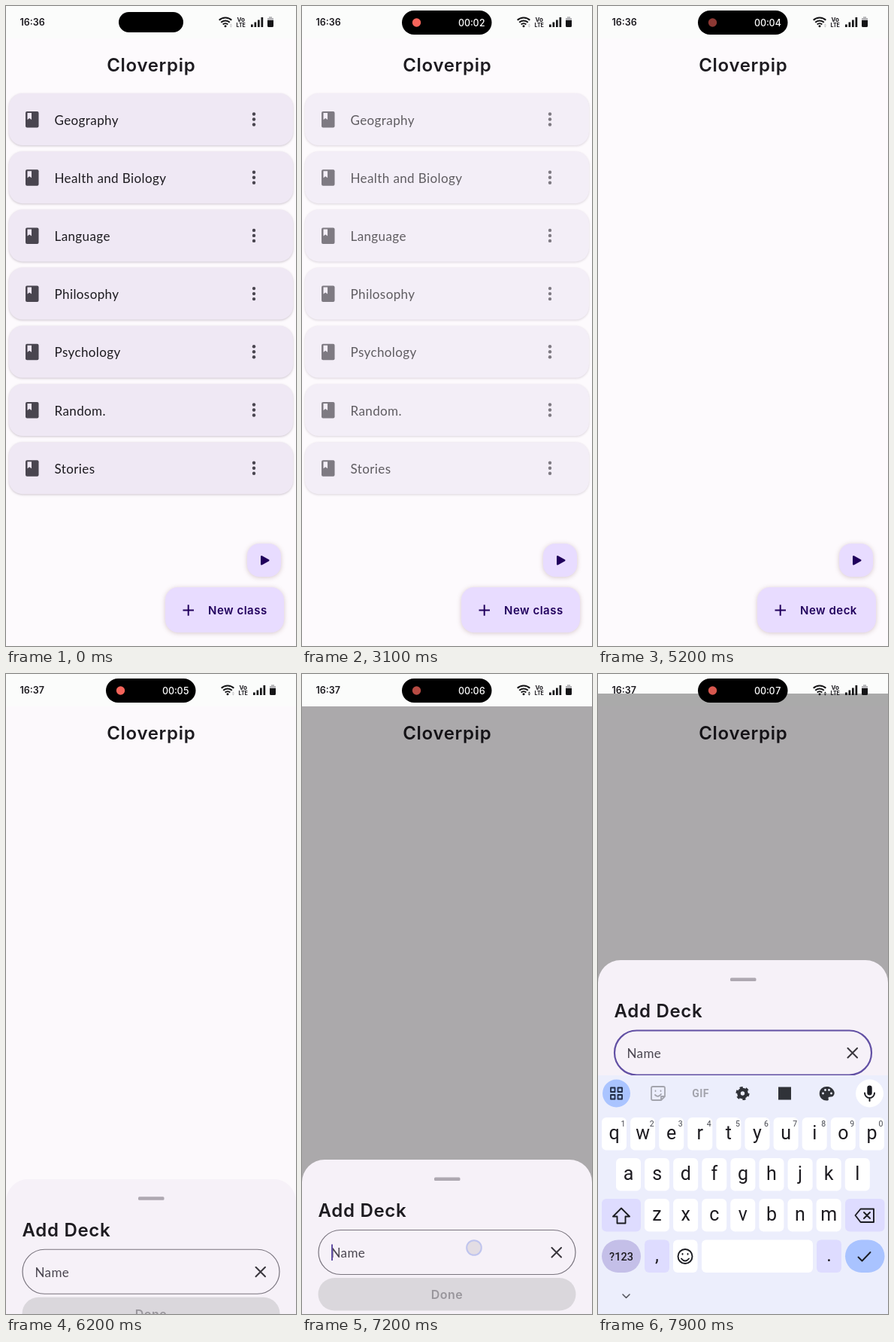
Animation, 386 px wide and 850 px high, one loop 8 s. Source, as an HTML page:

```html
<!DOCTYPE html>
<html lang="en">
<head>
<meta charset="utf-8">
<title>Flashcard app</title>
<style>
  html, body { margin: 0; width: 100%; height: 100%; overflow: hidden; background: #fdfafd; }
  svg { display: block; width: 386px; height: 850px; }
  text { font-family: Inter, "Open Sans", sans-serif; font-weight: 600; fill: #1d1b20; }
  .head { font-size: 24px; letter-spacing: .7px; }
  .body { font: 400 17px Lato, "Open Sans", sans-serif; letter-spacing: .4px; }
  .fab text { font-size: 15px; letter-spacing: .5px; fill: #21005d; }
  .card { fill: #efe8f4; filter: drop-shadow(0 1px 1.5px rgba(70, 50, 75, .26)); }
  .fab rect { fill: #e8dcff; filter: drop-shadow(0 1.5px 3px rgba(90, 40, 50, .24)); }
  .line { fill: none; stroke-linecap: round; stroke-linejoin: round; }
  .time { font-size: 12.5px; }
  .key { font: 400 25px Roboto, sans-serif; text-anchor: middle; }
  .hint { font: 400 10.5px Roboto, sans-serif; text-anchor: middle; fill: #44464f; }

  .island, .record, .icons, .old, .dot, .scrim, .pan, .sheet, .lift, .field, .caret, .touch, .board {
    animation: 8s linear infinite both;
  }
  .island { animation-name: island; }
  .record { animation-name: record; }
  .icons { animation-name: icons; }
  .old { animation-name: old; }
  .dot { animation-name: dot; }
  .scrim { animation-name: scrim; }
  .pan { animation-name: pan; }
  .sheet { animation-name: sheet; }
  .lift { animation-name: lift; }
  .field { animation-name: field; }
  .caret { animation-name: caret; }
  .touch { animation-name: touch; }
  .board { animation-name: board; }

  @keyframes island {
    0%, 3% { x: 150px; y: 8px; width: 86px; height: 27px; rx: 13.5px; animation-timing-function: cubic-bezier(.2, .6, .2, 1); }
    8.5%, 100% { x: 133px; y: 6px; width: 119.5px; height: 32px; rx: 16px; }
  }
  @keyframes record { 0%, 5% { opacity: 0; } 8.5%, 100% { opacity: 1; } }
  @keyframes icons { 0%, 3% { transform: translateX(-3px); } 8.5%, 100% { transform: none; } }
  @keyframes old { 0%, 37.5% { opacity: 1; } 41.8%, 100% { opacity: 0; } }
  @keyframes dot {
    0%, 1.25%, 20%, 38.75%, 57.5%, 76.25%, 95% { opacity: 1; animation-timing-function: ease-in-out; }
    10.625%, 29.375%, 48.125%, 66.875%, 85.625% { opacity: .53; animation-timing-function: ease-in-out; }
    100% { opacity: .85; }
  }
  @keyframes scrim {
    0%, 77.3% { opacity: 0; animation-timing-function: cubic-bezier(.4, 0, .2, 1); }
    80.9%, 100% { opacity: .325; }
  }
  @keyframes pan {
    0%, 92.5% { transform: none; animation-timing-function: cubic-bezier(.2, 0, 0, 1); }
    97.5%, 100% { transform: translateY(-17px); }
  }
  @keyframes sheet {
    0%, 74.25% { transform: translateY(206px); animation-timing-function: cubic-bezier(.4, 0, .2, 1); }
    79.7%, 100% { transform: none; }
  }
  @keyframes lift {
    0%, 92.5% { transform: none; animation-timing-function: cubic-bezier(.2, 0, 0, 1); }
    97.5%, 100% { transform: translateY(-265px); }
  }
  @keyframes field {
    0%, 90.2% { stroke: #79747e; stroke-width: 1.2px; }
    92%, 100% { stroke: #6250a4; stroke-width: 2.2px; }
  }
  @keyframes caret {
    0%, 89.8% { opacity: 0; }
    89.81%, 96.2% { opacity: 1; }
    96.21%, 100% { opacity: 0; }
  }
  @keyframes touch {
    0%, 88.7% { opacity: 0; }
    88.71%, 91.2% { opacity: 1; }
    91.21%, 100% { opacity: 0; }
  }
  @keyframes board {
    0%, 92.5% { transform: translateY(317px); animation-timing-function: cubic-bezier(.2, 0, 0, 1); }
    97.5%, 100% { transform: none; }
  }
</style>
</head>
<body>
<svg viewBox="0 0 386 850">
  <rect width="386" height="850" fill="#fdfafd"/>
  <rect width="386" height="43" fill="#fbfcfb"/>
  <text class="head" x="193.3" y="87" text-anchor="middle">Cloverpip</text>

  <g id="list" class="old"></g>

  <g class="fab">
    <rect x="321" y="714" width="45" height="44" rx="16"/>
    <path d="M340 731v10.500l9.500-5.250z" fill="#21005d" stroke="#21005d" stroke-width="2" stroke-linejoin="round"/>
    <rect x="212" y="772" width="158" height="60" rx="17"/>
    <path d="M235.500 802.500h14.500M242.700 795.200v14.500" stroke="#21005d" stroke-width="2"/>
    <text x="269" y="808">New <tspan id="noun">class</tspan></text>
  </g>

  <g class="pan"><rect class="scrim" y="43" width="386" height="830"/></g>

  <g class="lift"><g class="sheet">
    <path d="M0 1150V675a30 30 0 0 1 30-30H356a30 30 0 0 1 30 30V1150z" fill="#f6f1f8"/>
    <rect x="176" y="668.500" width="34.500" height="4.500" rx="1.500" fill="#aea8b1"/>
    <text class="head" x="21.500" y="721">Add Deck</text>
    <rect class="field" x="22" y="738.500" width="342" height="59" rx="29.500" fill="none"/>
    <text class="body" x="38.500" y="775" style="fill:#49454f">Name</text>
    <rect class="caret" x="39" y="757.500" width="2" height="21.500" fill="#6250a4"/>
    <path class="line" d="M332.500 762l12.500 12.500M345 762l-12.500 12.500" stroke="#39363d" stroke-width="2"/>
    <rect x="21.500" y="802" width="343" height="43.500" rx="21.700" fill="#dad7dc"/>
    <text x="193" y="830" text-anchor="middle" style="font-size:16px;letter-spacing:.5px;fill:#99969c">Done</text>
  </g></g>
  <circle class="touch" cx="229" cy="762" r="9.800" fill="#e3dde4" stroke="#bfc4ee" stroke-width="2"/>

  <g class="board">
    <rect y="533" width="386" height="320" fill="#eceefc"/>
    <circle cx="24.500" cy="557" r="18.500" fill="#aac4ff"/>
    <g class="line" stroke="#1f2a44" stroke-width="1.800">
      <path d="M17 549.500h5.500v5.500h-5.500zM26.500 549.500h5.500v5.500h-5.500zM17 559h5.500v5.500h-5.500zM26.500 559h5.500v5.500h-5.500z"/>
    </g>
    <g class="line" stroke="#a3a4ad" stroke-width="1.800">
      <path d="M84 566h-11a2 2 0 0 1-2-2v-14a2 2 0 0 1 2-2h14a2 2 0 0 1 2 2v11zl0-5h5M76 559q4 4 8-1M76.500 553.500v.5M83.500 553.500v.5"/>
    </g>
    <text x="136.500" y="562" text-anchor="middle" style="font:700 14px Roboto,sans-serif;fill:#a3a4ad;letter-spacing:.4px">GIF</text>
    <circle cx="192.500" cy="557" r="5" fill="none" stroke="#303238" stroke-width="4.600"/>
    <circle cx="192.500" cy="557" r="7.800" fill="none" stroke="#303238" stroke-width="2.600" stroke-dasharray="4.100 4.068"/>
    <rect x="240" y="548.500" width="17" height="17" fill="#303238"/>
    <path d="M305 548a9.300 9.300 0 1 0 0 18.500c3 0 1.500-2.500 1.500-3.500 0-2 4-1 6-2 6-5-1-13-7.500-13z" fill="#303238"/>
    <g fill="#eceefc">
      <circle cx="299.500" cy="557" r="1.400"/><circle cx="302.500" cy="552.500" r="1.400"/>
      <circle cx="307.500" cy="552.500" r="1.400"/><circle cx="310.500" cy="557" r="1.400"/>
    </g>
    <circle cx="361.500" cy="557" r="18.500" fill="#fff"/>
    <rect x="358.300" y="546.500" width="6.400" height="13" rx="3.200" fill="#1b1c22"/>
    <path class="line" d="M355 556.500a6.500 6.500 0 0 0 13 0M361.500 563v4" stroke="#1b1c22" stroke-width="2"/>
    <g id="keys"></g>
    <g class="line" stroke="#1b1c22" stroke-width="1.900">
      <path d="M31 709.500l-11 11h5.500v9h11v-9h5.500z"/>
      <path d="M342.500 719l7-8.500h17.500v17.500h-17.500zM354 715l8 8M362 715l-8 8"/>
      <circle cx="116" cy="773.500" r="9.500"/>
      <path d="M111 776.500q5 6 10 0M112.500 770v.7M119.500 770v.7"/>
      <path d="M346.500 774.500l5 5 11-11.500"/>
      <path d="M33 824l4.500 4.500 4.500-4.500" stroke="#55565e" stroke-width="1.600"/>
    </g>
    <text x="31" y="778.500" text-anchor="middle" style="font:500 14.500px Roboto,sans-serif">?123</text>
  </g>

  <text id="clock" class="time" x="18.500" y="25.500">16:36</text>
  <rect class="island" x="133" y="6" width="119.500" height="32" rx="16"/>
  <g class="record">
    <circle class="dot" cx="152.500" cy="22" r="5.700" fill="#f9665c"/>
    <text id="timer" class="time" x="208" y="26.500" style="font-weight:500;fill:#fff;font-feature-settings:'tnum'">00:00</text>
  </g>
  <g class="icons" fill="#151517">
    <g fill="none" stroke="#151517" stroke-width="2">
      <path d="M286.700 18.800a12 12 0 0 1 16.600 0M289.200 21.800a8.300 8.300 0 0 1 11.600 0M291.700 24.500a4.800 4.800 0 0 1 6.600 0"/>
    </g>
    <circle cx="295" cy="26.700" r="1.500"/>
    <path id="arrows" d="M300.800 25.500l1.600-2 1.600 2zM300.800 26.500l1.600 2 1.600-2z"/>
    <text x="315.700" y="20.500" text-anchor="middle" style="font-size:8px;font-weight:700">Vo</text>
    <text x="315.700" y="28" text-anchor="middle" style="font-size:7px;font-weight:700">LTE</text>
    <path d="M329 24.500h2.700v3.500h-2.700zM333.500 21.500h2.700v6.500h-2.700zM338 18.500h2.700v9.500h-2.700zM342.500 15h2.700v13h-2.700z"/>
    <path d="M351 19.500v-3.500h2v-1.800h4v1.800h2v3.500z" fill="#b5b5b8"/>
    <path d="M351 19h8v7.500a1.500 1.500 0 0 1-1.500 1.500h-5a1.500 1.500 0 0 1-1.500-1.500z"/>
  </g>
</svg>
<script>
  const byId = id => document.getElementById(id);
  const loop = 8000;

  const subjects = ['Geography', 'Health and Biology', 'Language', 'Philosophy', 'Psychology', 'Random.', 'Stories'];
  byId('list').innerHTML = subjects.map((name, i) => `
    <g transform="translate(0 ${116 + i * 77.2})">
      <rect class="card" x="4" width="378" height="69" rx="18"/>
      <rect x="26" y="24" width="17.500" height="21.500" rx="2" fill="#49454f"/>
      <path d="M28.500 26h5.500v9l-2.750-2-2.750 2z" fill="#efe8f4"/>
      <text class="body" x="64.500" y="41.500">${name}</text>
      ${[27.5, 34.5, 41.5].map(y => `<circle cx="330" cy="${y}" r="2.200" fill="#49454f"/>`).join('')}
    </g>`).join('');

  const cap = (x, y, w, fill = '#fff', r = 6) =>
    `<rect x="${x}" y="${y}" width="${w}" height="43.500" rx="${r}" fill="${fill}"/>`;
  const row = (letters, x, y, hints = '') => [...letters].map((c, i) => {
    const cx = x + i * 38.1;
    const hint = hints ? `<text class="hint" x="${cx + 12}" y="${y + 12}">${hints[i]}</text>` : '';
    return cap(cx - 16.5, y, 33) + `<text class="key" x="${cx}" y="${y + 29}">${c}</text>` + hint;
  }).join('');
  const soft = '#dedcff';
  byId('keys').innerHTML =
    row('qwertyuiop', 21.5, 589, '1234567890') + row('asdfghjkl', 40.5, 643) + row('zxcvbnm', 78.5, 697) +
    cap(5, 697, 52, soft) + cap(329, 697, 52.5, soft) +
    cap(5, 751.5, 52, '#c4bfe8', 21.7) + cap(62, 751.5, 33, soft) + cap(100, 751.5, 32.5) +
    cap(138, 751.5, 148) + cap(291, 751.5, 33, soft) + cap(329, 751.5, 52.5, '#a9c3ff', 21.7) +
    `<text class="key" x="78.500" y="780">,</text><text class="key" x="307.500" y="780">.</text>`;

  const put = (id, value) => {
    const el = byId(id);
    if (el.textContent !== value) el.textContent = value;
  };
  function tick() {
    const t = performance.now() % loop;
    put('timer', '00:0' + Math.max(0, Math.floor((t - 600) / 1000)));
    put('clock', t < 5800 ? '16:36' : '16:37');
    put('noun', t < 3150 ? 'class' : 'deck');
    byId('arrows').setAttribute('fill', t < 6800 ? '#c4c4c6' : '#151517');
    requestAnimationFrame(tick);
  }
  tick();
</script>
</body>
</html>
```
